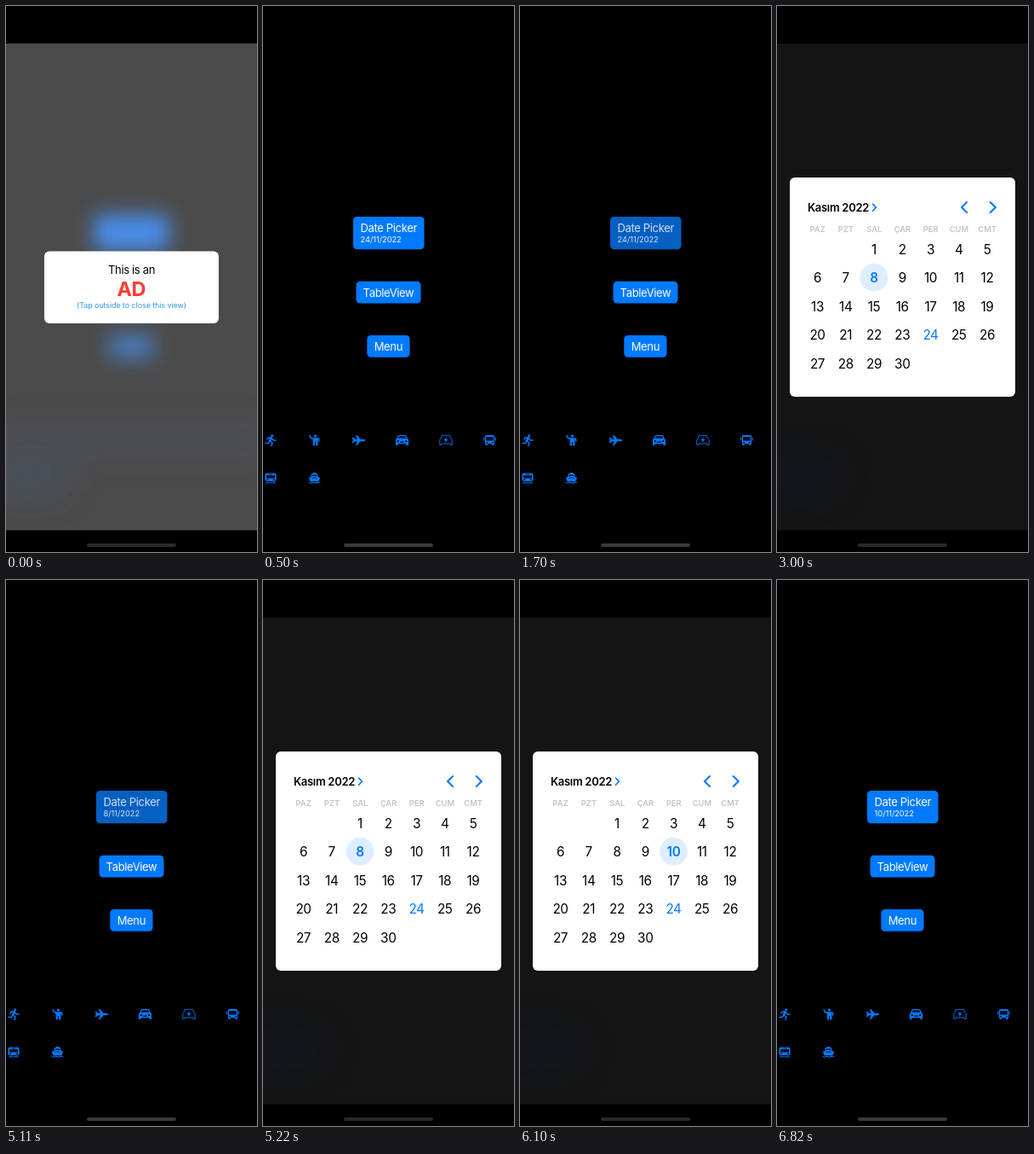
Recreate the animation shown at these times as an HTML page. Size 295 by 640 pixels, loop 8 s.

```html
<!DOCTYPE html>
<html lang="en">
<head>
<meta charset="utf-8">
<title>Date picker demo</title>
<style>
html, body { margin: 0; width: 100%; height: 100%; overflow: hidden; background: #000; }
svg { display: block; width: 100%; height: 100%; }
text { font-family: Inter, Roboto, sans-serif; }
.label { font-size: 13px; letter-spacing: -.34px; }
.small { font-size: 9.2px; }
.mid { text-anchor: middle; }
.title { font-size: 13px; font-weight: 600; letter-spacing: -.3px; }
.weekday { font-size: 9.4px; font-weight: 600; fill: #c4c4c7; }
.day { font-size: 15.3px; letter-spacing: -.4px; }
.picked { font-weight: 600; }
.line { fill: none; stroke: #007aff; stroke-linecap: round; stroke-linejoin: round; }
</style>
</head>
<body>
<svg viewBox="0 0 295 640">
  <defs>
    <filter id="blur" x="-100%" y="-150%" width="300%" height="400%"><feGaussianBlur stdDeviation="11.5"/></filter>
    <filter id="haze" x="-100%" y="-150%" width="300%" height="400%"><feGaussianBlur stdDeviation="20"/></filter>
    <clipPath id="safe"><rect y="44" width="295" height="570.5"/></clipPath>
  </defs>
  <rect width="295" height="640"/>

  <g id="ad">
    <g clip-path="url(#safe)">
      <rect y="44" width="295" height="571" fill="#4b4b4b"/>
      <g fill="#4a90ee" filter="url(#blur)">
        <rect x="104" y="245" width="87" height="41"/>
        <rect x="109" y="323" width="77" height="26"/>
        <rect x="122" y="386" width="51" height="26" opacity=".75"/>
      </g>
      <g fill="#4a78c0" filter="url(#haze)">
        <rect x="-20" y="495" width="335" height="28" opacity=".1"/>
        <rect x="-20" y="535" width="90" height="35" opacity=".17"/>
      </g>
    </g>
    <rect x="45" y="287.5" width="205" height="84.5" rx="6" fill="#fff"/>
    <text class="label mid" x="147.5" y="314.3">This is an</text>
    <text class="mid" x="147.3" y="340.3" font-size="23.5" font-weight="700" letter-spacing="-.5" fill="#ff3b30">AD</text>
    <text class="mid" x="147.5" y="354.3" font-size="9" letter-spacing="-.1" fill="#3399f0">(Tap outside to close this view)</text>
  </g>

  <g id="home">
    <g fill="#007aff">
      <rect id="dateButton" x="106" y="247" width="83.5" height="38.3" rx="4.6"/>
      <rect x="109.5" y="322.8" width="76" height="25.8" rx="4.6"/>
      <rect x="122.3" y="386" width="50.2" height="25.8" rx="4.6"/>
    </g>
    <g fill="#fff">
      <g id="dateLabels">
        <text class="label" x="114.5" y="264.7">Date Picker</text>
        <text class="small" id="dateText" x="114.6" y="277.4"></text>
      </g>
      <text class="label mid" x="147.5" y="340.5">TableView</text>
      <text class="label mid" x="147.4" y="403.6">Menu</text>
    </g>
    <g id="icons" fill="#007aff"></g>
  </g>

  <g id="calendar">
    <rect y="44" width="295" height="570.5" fill="#141414"/>
    <g clip-path="url(#safe)"><rect x="-20" y="530" width="90" height="40" fill="#16325c" opacity=".2" filter="url(#haze)"/></g>
    <rect x="15" y="201" width="265" height="257" rx="6" fill="#fff"/>
    <text class="title" x="36" y="240.5">Kasım 2022</text>
    <path class="line" stroke-width="1.6" d="M112.4 232l4 4.1-4 4.1"/>
    <path class="line" stroke-width="2.1" d="M223 230l-6 6 6 6M250.8 230l6 6-6 6"/>
    <circle id="ring" r="16.4" fill="#dfeeff"/>
    <g id="grid"></g>
  </g>

  <rect id="homeBar" x="95" y="630" width="105" height="4" rx="2"/>
</svg>
<script>
const $ = id => document.getElementById(id);
const BLUE = '#007aff', LOOP = 8000, TODAY = 24;
const colX = i => 47.7 + 33.25 * i;
const rowY = i => 285 + 33.5 * i;

// Symbols are drawn around their own centre.
const symbols = [
  // runner
  `<circle cx="1.7" cy="-5.2" r="1.5"/>
   <path class="line" stroke-width="1.5" d="M-4-1l1-2H1l2 3h3M1-2.6L-1 1l3 2-1 3.3M-1 1l-2 2.6h-3"/>
   <path class="line" stroke-width="2.4" d="M.3-2.4L-1 .7"/>`,
  // waving person
  `<circle cx="1" cy="-4.9" r="1.7"/>
   <path d="M-3-2.8H4.2Q6-2.8 6-1V1.8H4.7V-.8H4V6.2H1.6V2H.6V6.2H-1.8V-.8Z"/>
   <path class="line" stroke-width="1.5" d="M-2.2-2L-4.4-2.8-5.4-5.6"/>`,
  // plane
  `<path d="M8.3 0Q8 1.3 5.5 1.3H2.5L-1.5 6H-3L-1.2 1.3H-4L-6 3.3H-7.3L-6.3 0-7.3-3.3H-6L-4-1.3H-1.2L-3-6H-1.5L2.5-1.3H5.5Q8-1.3 8.3 0Z"/>`,
  // car
  `<path fill-rule="evenodd" d="M-4.6-5.8Q0-6.6 4.6-5.8L6.2-2.2 7.6-.6V5.2Q7.6 6 6.8 6H5.5Q4.8 6 4.8 5.2V4.2H-4.8V5.2Q-4.8 6-5.5 6H-6.8Q-7.6 6-7.6 5.2V-.6L-6.2-2.2ZM-3.8-4.6L-4.8-2.2Q0-2.6 4.8-2.2L3.8-4.6Q0-5 -3.8-4.6ZM-5.8.1V1.9H-3.6V.6ZM5.8.1V1.9H3.6V.6ZM-2.4 1.5V2.7H2.4V1.5Z"/>`,
  // electric car
  `<path class="line" stroke-width=".9" d="M-4.4-5.5Q0-6.2 4.4-5.5L6-1.8 7.2-.4V5.4H5V3.9H-5V5.4H-7.2V-.4L-6-1.8Z"/>
   <path d="M1-4L-2.6 .3H-.4L-1.2 3.2 2.5-1.1H.3Z"/>`,
  // bus
  `<path fill-rule="evenodd" d="M-4-6H4Q5.6-6 5.6-4.4V4.2H5V5.3Q5 6 4.2 6H3.5Q2.8 6 2.8 5.3V4.2H-2.8V5.3Q-2.8 6-3.5 6H-4.2Q-5 6-5 5.3V4.2H-5.6V-4.4Q-5.6-6-4-6ZM-4.3-3.9V.6H4.3V-3.9ZM-4.3 2V3.2H-2.4V2ZM4.3 2V3.2H2.4V2Z"/>
   <path d="M-7.3-3.5H-6.2V.5H-7.3ZM6.2-3.5H7.3V.5H6.2Z"/>`,
  // tram
  `<path fill-rule="evenodd" d="M-4-6H4Q6.6-6 6.6-3V1.6Q6.6 3.6 4.6 3.6H-4.6Q-6.6 3.6-6.6 1.6V-3Q-6.6-6-4-6ZM-2.4-5.1V-4.2H2.4V-5.1ZM-5-3.2V0H5V-3.2ZM-4.8 1.2V2.4H-2.8V1.2ZM4.8 1.2V2.4H2.8V1.2Z"/>
   <path class="line" stroke-width="1" d="M-4 4.2L-5.4 6M4 4.2L5.4 6M-4.5 5.3H4.5"/>`,
  // ferry
  `<path fill-rule="evenodd" d="M-1.6-6.6H1.6V-5.4H3.3L4.3-1.5 6.7-.4 5 3.4Q2.5 4.6 0 3.2-2.5 4.6-5 3.4L-6.7-.4-4.3-1.5-3.3-5.4H-1.6ZM-2.4-4.1L-2.9-2 0-3 2.9-2 2.4-4.1ZM-4.8 .4L0-1.2 4.8 .4 0-.3Z"/>
   <path class="line" stroke-width="1.1" d="M-6.3 5Q-4.5 6.2-2.5 5.3T0 5.3 2.5 5.3 6.3 5"/>`
];
$('icons').innerHTML = symbols.map((shape, i) =>
  `<g transform="translate(${9 + 51.5 * (i % 6)} ${i < 6 ? 509 : 553.5})">${shape}</g>`).join('');

const weekdays = ['PAZ', 'PZT', 'SAL', 'ÇAR', 'PER', 'CUM', 'CMT'];
const cell = day => [colX((day + 1) % 7), rowY(Math.floor((day + 1) / 7))];
$('grid').innerHTML =
  weekdays.map((name, i) => `<text class="weekday mid" x="${colX(i)}" y="264.6">${name}</text>`).join('') +
  Array.from({ length: 30 }, (_, i) => {
    const [x, y] = cell(i + 1);
    return `<text class="day mid" x="${x - .2}" y="${y + 5.5}">${i + 1}</text>`;
  }).join('');
const dayTexts = document.querySelectorAll('.day');

const timeline = [
  { at: 0, scene: 'ad' },
  { at: 500, scene: 'home', day: 24 },
  { at: 1700, scene: 'home', day: 24, pressed: true },
  { at: 3000, scene: 'calendar', day: 8 },
  { at: 4090, scene: 'home', day: 8 },
  { at: 5110, scene: 'home', day: 8, pressed: true },
  { at: 5220, scene: 'calendar', day: 8 },
  { at: 6100, scene: 'calendar', day: 10 },
  { at: 6820, scene: 'home', day: 10 }
];

function show({ scene, day, pressed }) {
  for (const id of ['ad', 'home', 'calendar'])
    $(id).style.display = id === scene ? '' : 'none';
  $('homeBar').setAttribute('fill', scene === 'home' ? '#3a3a3a' : '#2a2a2a');

  if (scene === 'home') {
    $('dateText').textContent = `${day}/11/2022`;
    $('dateButton').setAttribute('fill', pressed ? '#0560c2' : BLUE);
    $('dateLabels').setAttribute('fill', pressed ? '#cfe0f5' : '#fff');
  }
  if (scene === 'calendar') {
    const [x, y] = cell(day);
    $('ring').setAttribute('cx', x - .2);
    $('ring').setAttribute('cy', y - .5 + .2);
    dayTexts.forEach((text, i) => {
      const picked = i + 1 === day;
      text.classList.toggle('picked', picked);
      text.setAttribute('fill', picked || i + 1 === TODAY ? BLUE : '#000');
    });
  }
}

let current;
const start = performance.now();
function tick() {
  const time = (performance.now() - start) % LOOP;
  const step = timeline.findLast(s => s.at <= time);
  if (step !== current) show(current = step);
  requestAnimationFrame(tick);
}
tick();
</script>
</body>
</html>
```
